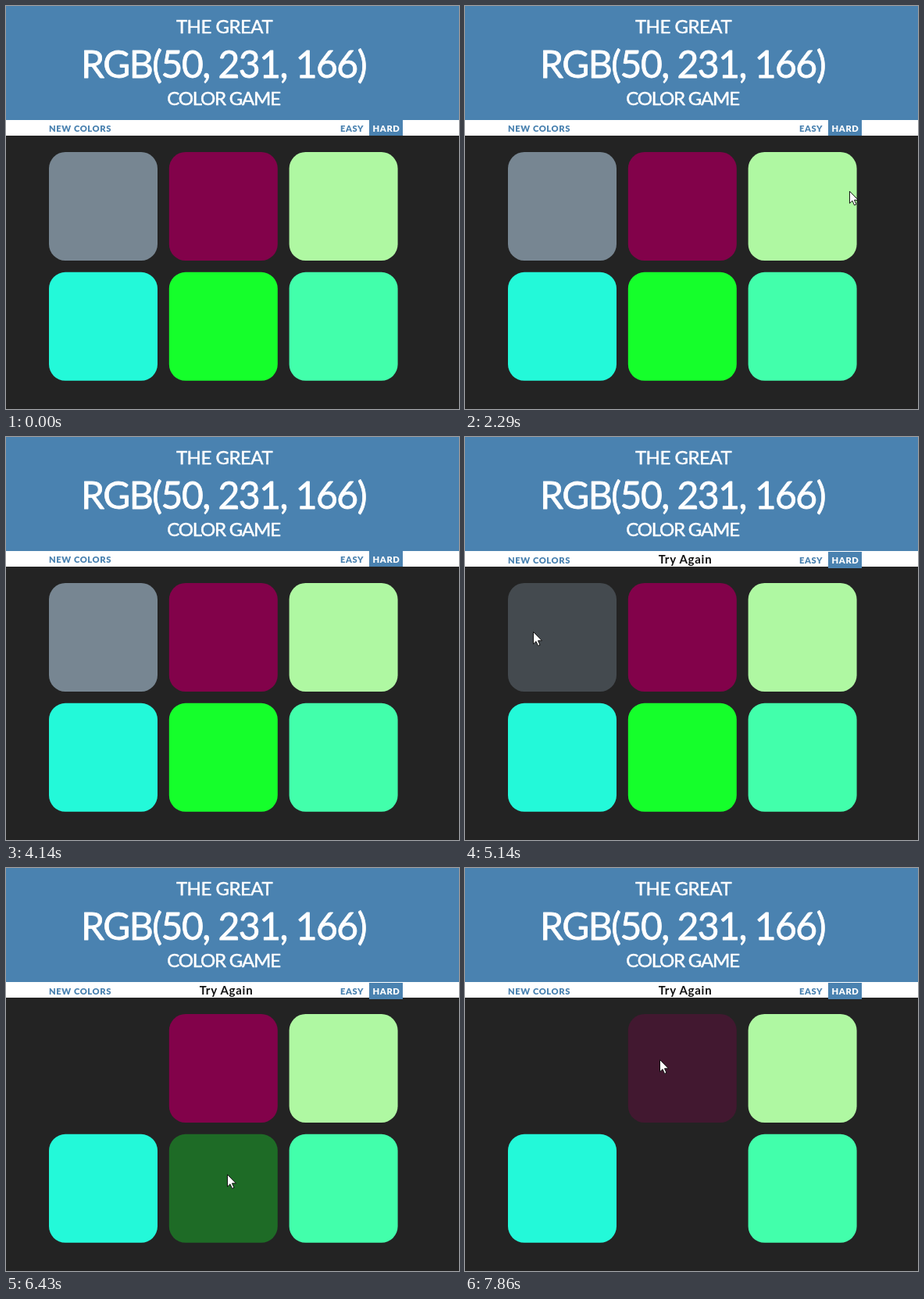
Write an HTML page that moves like this. It is 580 by 516 pixels and loops after 8000 ms.

```html
<!DOCTYPE html>
<html lang="en">
<head>
<meta charset="utf-8">
<title>Color game</title>
<style>
  html, body { margin: 0; width: 100%; height: 100%; overflow: hidden; background: #232323; }
  svg { display: block; width: 580px; height: 516px; }
  text { font-family: Lato, "Open Sans", sans-serif; text-anchor: middle; }
  .title { fill: #fff; stroke: #fff; stroke-width: .5; stroke-linejoin: round;
           font-size: 24px; letter-spacing: -.5px; }
  .rgb { font-size: 48px; letter-spacing: -1.5px; stroke-width: .8; }
  .tight { letter-spacing: -1.2px; }
  .nav text { font-size: 11.2px; font-weight: 900; letter-spacing: .05em; fill: #4a82b0; }
  .nav .on { fill: #fff; }
  .nav #message { fill: #111; font-weight: 700; }
</style>
</head>
<body>
<svg viewBox="0 0 580 516">
  <rect width="580" height="516" fill="#232323"/>
  <rect width="580" height="146" fill="#4a82b0"/>
  <text class="title" x="279.5" y="35">THE GREAT</text>
  <text class="title rgb" x="278.5" y="91.5">RGB(50, 231, 166)</text>
  <text class="title tight" x="278.5" y="127">COLOR GAME</text>
  <rect y="146" width="580" height="20" fill="#fff"/>
  <g id="nav" class="nav">
    <rect id="tab" x="465" y="146" width="43" height="20" fill="#4a82b0"/>
    <text x="95" y="160.5">NEW COLORS</text>
    <text x="443" y="160.5">EASY</text>
    <text class="on" x="487" y="160.5">HARD</text>
    <text id="message" x="282" y="161">Try Again</text>
  </g>
  <g id="squares"></g>
  <path id="cursor" d="M.5 .5V16L4 12.7 6.6 18.4 9 17.3 6.5 11.8H11.5Z" fill="#fff" stroke="#111"/>
</svg>
<script>
const LOOP = 8000, FPS = 7, FADE = 600, BIG = 500;
const LEFT = 55, TOP = 187, SIZE = 139, PITCH = 153.8;
const colors = ["#778692", "#82024a", "#aff8a2", "#23f9d9", "#15ff2b", "#42ffab"];
const $ = id => document.getElementById(id);

// Pointer moves; each starts where the previous one ended unless "from" is given
const moves = [
  { start: 140, end: 430, from: [300, 446], to: [430, 260] },
  { start: 710, end: 1290, to: [455, 24] },
  { start: 1570, end: 3000, to: [403, 255], bend: [63, 97] },
  { start: 4280, end: 4920, from: [338, 200], to: [87, 249], bend: [-40, -150], click: true },
  { start: 5290, end: 6170, to: [283, 392], bend: [20, -10], click: true },
  { start: 7290, end: 7600, to: [249, 245], click: true }
];
moves.forEach((m, i) => m.from ||= moves[i - 1].to);
const isVisible = time => time > 140 && (time < 3280 || time > 4280);

const squares = colors.map((fill, i) => {
  const square = document.createElementNS("http://www.w3.org/2000/svg", "rect");
  const attrs = { x: LEFT + i % 3 * PITCH, y: TOP + Math.floor(i / 3) * PITCH,
                  width: SIZE, height: SIZE, rx: 21, fill };
  for (const key in attrs) square.setAttribute(key, attrs[key]);
  return $("squares").appendChild(square);
});

function squareAt([x, y]) {
  return squares[Math.floor((x - LEFT) / PITCH) + 3 * Math.floor((y - TOP) / PITCH)];
}

function progress(time, start, end) {
  return Math.max(0, Math.min(1, (time - start) / (end - start)));
}

function pointerAt(time) {
  const { start, end, from, to, bend = [0, 0] } = moves.findLast(m => time >= m.start);
  const p = progress(time, start, end), eased = p * p * (3 - 2 * p);
  return from.map((a, n) => a + (to[n] - a) * eased + bend[n] * Math.sin(Math.PI * eased));
}

function draw() {
  // The picture advances in whole steps, like a screen capture
  const time = Math.floor((performance.now() % LOOP + 3) * FPS / 1000) * 1000 / FPS % LOOP;

  const clicks = moves.filter(m => m.click);
  for (const { end, to } of clicks) {
    squareAt(to).setAttribute("opacity", (1 - progress(time, end, end + FADE)) ** 2);
  }

  const last = clicks.findLast(m => time >= m.end);
  const big = last && time - last.end < BIG;
  $("message").style.display = last ? "" : "none";
  $("message").style.fontSize = big ? "15px" : "11.5px";
  $("nav").setAttribute("transform", `translate(0 ${big ? 1 : 0})`);
  $("tab").setAttribute("height", last ? 21 : 20);

  const visible = isVisible(time);
  $("cursor").style.display = visible ? "" : "none";
  if (visible) $("cursor").setAttribute("transform", `translate(${pointerAt(time)})`);
  requestAnimationFrame(draw);
}
draw();
</script>
</body>
</html>
```
